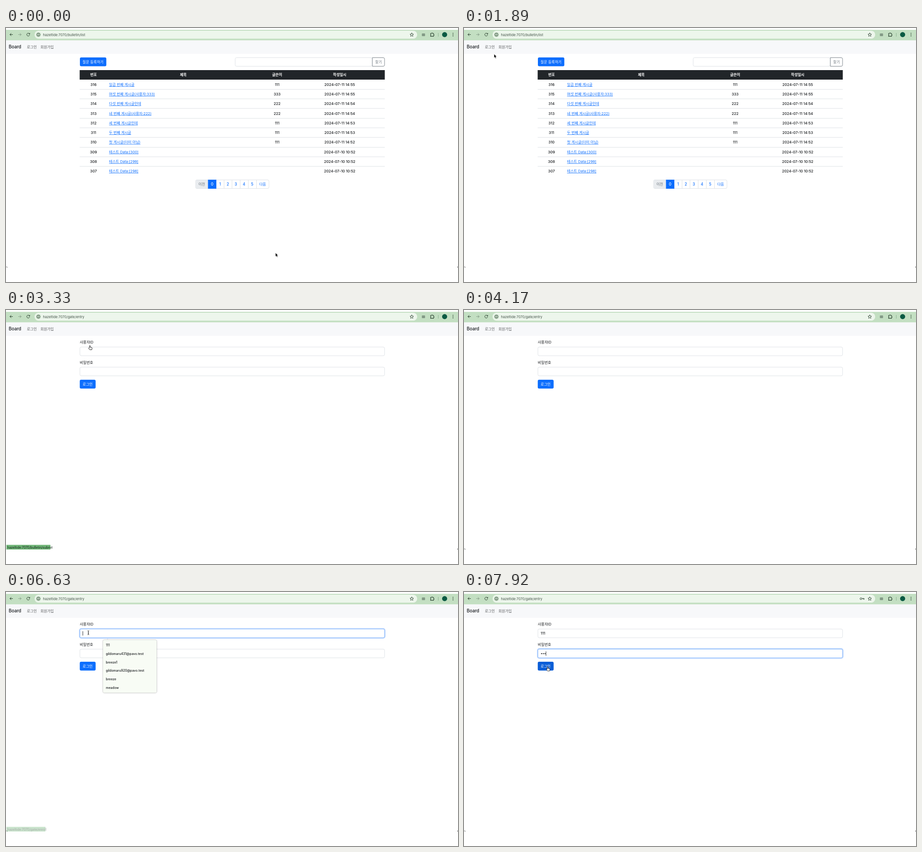
Animation of 997x561 px, one loop 8 s. Source, as an HTML page:

```html
<!DOCTYPE html>
<html lang="ko">
<head>
<meta charset="utf-8">
<style>
  html, body { margin: 0; width: 100%; height: 100%; overflow: hidden; background: #fff; }
  svg { display: block; }
  text { font-family: Inter, 'Noto Sans CJK KR', 'Noto Sans CJK', sans-serif; white-space: pre; }
</style>
</head>
<body>
<svg id="stage" width="997" height="561" viewBox="0 0 997 561"></svg>
<script>
const LOOP = 8000;
const BLUE = '#0d6efd', HOVER = '#0b5ed7', INK = '#16191c', LINE = '#dee2e6';
const HOST = 'hazeltide:7070/';

// y is the vertical middle of the text
const text = (x, y, str, { size = 8, fill = INK, weight = 400, anchor = 'start', more = '' } = {}) =>
  `<text x="${x}" y="${y + size * .36}" font-size="${size}" fill="${fill}" font-weight="${weight}" text-anchor="${anchor}" ${more}>${str}</text>`;
const centered = (x, y, str, opts) => text(x, y, str, { anchor: 'middle', ...opts });
const rect = (x, y, w, h, fill, more = '') =>
  `<rect x="${x}" y="${y}" width="${w}" height="${h}" fill="${fill}" ${more}/>`;
const path = (d, stroke, width = 1, more = '') =>
  `<path d="${d}" fill="none" stroke="${stroke}" stroke-width="${width}" ${more}/>`;
const group = (id, body) => `<g id="${id}">${body}</g>`;

function browser() {
  const dark = '#263c2b', grey = '#839a86';
  return rect(0, 4, 997, 23.5, '#c3dfc2') + rect(63, 6, 844, 17.5, '#edf6ec', 'rx="8.7"') +
    path('M15 14.5H8.6M11.6 11.5l-3 3 3 3', dark) +
    path('M27.2 14.5h6.4M30.6 11.5l3 3-3 3', grey) +
    path('M51.6 12.6a3.2 3.2 0 1 0 .6 2.6M52.4 11v2.4H50', dark) +
    '<circle cx="71.5" cy="14.7" r="6" fill="#d3e6d3"/>' +
    '<circle cx="71.5" cy="14.7" r="3.4" fill="none" stroke="#263c2b"/>' +
    path('M71.5 14.2v2.4M71.5 12.7v.9', dark) +
    path('M895 10.7l1.1 2.7 2.9.2-2.2 1.9.7 2.9-2.5-1.6-2.5 1.6.7-2.9-2.2-1.9 2.9-.2z', dark, .9) +
    rect(917.3, 12, 7, 6, grey, 'rx="1"') +
    path('M936.5 12h2.2a1.2 1.2 0 0 1 2.4 0h2v2.2a1.2 1.2 0 0 1 0 2.4v1.8h-6.6v-2a1.2 1.2 0 0 0 0-2.2z', dark, 1.1) +
    path('M953.5 11v8', '#8db391') +
    '<circle cx="967.5" cy="14.6" r="5.6" fill="#0a5a43"/>' +
    [11.6, 14.6, 17.6].map(y => `<circle cx="986" cy="${y}" r=".9" fill="${dark}"/>`).join('') +
    group('key', `<circle cx="875.5" cy="14.8" r="2" fill="none" stroke="${dark}"/>` +
      path('M877.6 14.2h5v2.6M880.4 14.2v2.4', dark)) +
    rect(0, 27.5, 997, 29.5, '#f7f8fa') +
    text(6, 41.8, 'Board', { size: 9.8, weight: 500 }) +
    text(46, 41.8, '로그인', { fill: '#595b5d' }) + text(76, 41.8, '회원가입', { fill: '#595b5d' }) +
    path('M1 527l2 2', '#222') + path('M996.5 527v2', '#222');
}

function listPage() {
  const titles = ['일곱 번째 게시글', '여섯 번째 게시글(사용자:333)', '다섯 번째 게시글인데',
    '네 번째 게시글(사용자:222)', '세 번째 게시글인데', '두 번째 게시글', '첫 게시글(더미 아님)',
    '테스트 Data:[300]', '테스트 Data:[299]', '테스트 Data:[298]'];
  const writers = [111, 333, 222, 222, 111, 111, 111];
  const minutes = [55, 55, 54, 54, 53, 53, 52];
  const cell = { size: 8.1, weight: 500 };
  const head = { fill: '#fff', weight: 700 };

  let out = rect(163, 65, 58.3, 19.5, BLUE, 'rx="3" id="create"') +
    centered(192, 74.8, '질문 등록하기', { fill: '#fff', weight: 500 }) +
    rect(505.5, 65.5, 302.5, 19, '#fff', `rx="3" stroke="${LINE}"`) +
    path('M808 65.5h24a3 3 0 0 1 3 3v13a3 3 0 0 1-3 3h-24z', '#6c757d', .9) +
    centered(821.7, 75, '찾기', { fill: '#6c757d' }) +
    rect(162.5, 93, 673, 21, '#212529') +
    centered(193, 103.5, '번호', head) + centered(391, 103.5, '제목', head) +
    centered(598, 103.5, '글쓴이', head) + centered(736, 103.5, '작성일시', head);

  titles.forEach((title, i) => {
    const y = 124.9 + i * 21.27;
    const date = i < 7 ? `2024-07-11 14:${minutes[i]}` : '2024-07-10 10:52';
    out += centered(193, y, 316 - i, cell) +
      text(227.3, y, title, { fill: BLUE, more: 'text-decoration="underline"' }) +
      centered(598, y, writers[i] ?? '', cell) + centered(736, y, date, cell);
    if (i < 9) out += rect(162.5, Math.round(y + 10), 673, 1, LINE);
  });

  const edges = [418, 445.5, 464, 480.5, 498, 516, 534, 552, 580];
  out += rect(418, 335.5, 162, 19, '#fff', `rx="3" stroke="${LINE}"`) +
    rect(418.5, 336, 27, 18, '#e9ecef') + rect(445.5, 335, 18.5, 20, BLUE);
  ['이전', 0, 1, 2, 3, 4, 5, '다음'].forEach((label, i) => {
    const fill = i == 0 ? '#6c757d' : i == 1 ? '#fff' : BLUE;
    if (i > 2) out += rect(edges[i], 335.5, 1, 19, LINE);
    out += centered((edges[i] + edges[i + 1]) / 2, 345.2, label, { fill, size: i % 7 ? 8.4 : 8, weight: i % 7 ? 500 : 400 });
  });
  return out;
}

function field(id, y) {
  return rect(163, y, 672, 19.2, '#fff', `rx="3" stroke="${LINE}"`) +
    group(id, rect(162, y - 1, 674, 21.2, 'none', 'rx="4" stroke="#0d6efd" stroke-opacity=".25" stroke-width="2.2"') +
      rect(163, y, 672, 19.2, '#fff', 'rx="3" stroke="#86b7fe"'));
}

function loginPage() {
  const names = ['111', 'gildomaru431@pavo.test', 'breeze1', 'gildomaru920@pavo.test', 'breeze', 'meadow'];
  return text(162.7, 71.3, '사용자ID') + field('ring1', 81.8) +
    text(162.7, 115.7, '비밀번호') + field('ring2', 126.2) +
    text(169, 91.5, '111', { size: 8.2, weight: 500, more: 'id="user"' }) +
    group('dots', [0, 1, 2].map(i => `<circle cx="${171 + i * 3.8}" cy="136.2" r="1.15" fill="${INK}"/>`).join('')) +
    rect(0, 0, .9, 9.6, INK, 'id="caret"') +
    rect(162.7, 154, 35, 19.6, BLUE, 'rx="3" id="submit"') +
    centered(180.1, 164, '로그인', { fill: '#fff', weight: 500 }) +
    group('suggest', rect(214, 106, 118.3, 116.5, '#f8fcf5',
      'rx="3" style="filter:drop-shadow(0 .6px 1.2px #0007)"') +
      path('M223 104.5l2-1', '#b9c7dd', .8) +
      names.map((name, i) => text(220.2, 117.8 + i * 18.65, name, { size: 7, weight: 500 })).join(''));
}

const pointers =
  group('arrow', '<path d="M0 0v8.4l1.9-1.7 1.4 3 1.5-.7-1.4-2.9h2.5z" fill="#000" stroke="#fff" stroke-width=".6"/>') +
  group('hand', '<path d="M-.9 5.2V.8a.9.9 0 0 1 1.8 0v2.7l3.2.8q1 .3.9 1.4l-.8 3.5h-4.6l-2.6-3.3q.5-1.4 2.1-.7z" fill="#fff" stroke="#111" stroke-width=".9"/>') +
  group('ibeam', path('M-1.8-4.5q1.8 0 1.8 1V3.4q0 1-1.8 1M1.8-4.5q-1.8 0-1.8 1V3.4q0 1 1.8 1M-1 1H1', '#222', .9));

const stage = document.getElementById('stage');
stage.innerHTML = browser() + text(81.5, 14.9, '', { size: 7.5, fill: '#435348', more: 'id="url"' }) +
  group('list', listPage()) + group('login', loginPage()) +
  group('status', rect(1, 518.7, 97, 10.3, '#70b577', 'id="statusBox"') +
    text(3, 524, '', { size: 7, fill: '#13251a', more: 'id="statusText"' })) +
  group('pointer', pointers);
const $ = id => document.getElementById(id);

// time, x, y of the pointer hot spot
const route = [[480, 594.4, 496.6], [1230, 60, 50], [1560, 36, 60], [1890, 66.3, 57.5], [2070, 92, 62],
  [2430, 185, 78.6], [3390, 185, 78.6], [3540, 181.6, 90], [4890, 181.6, 90], [5250, 99.4, 87.2],
  [5430, 99.4, 87.2], [5760, 90, 42], [6210, 90, 42], [6420, 181.6, 90], [7440, 181.6, 90],
  [7740, 181.5, 163.5], [7830, 181.5, 163.5], [7920, 184.6, 165.2]];

const clamp = v => Math.min(1, Math.max(0, v));
const ramp = (t, from, to) => clamp((t - from) / (to - from));
const between = (t, from, to) => t >= from && t < to;
const pulse = (t, a, b, c, d) => ramp(t, a, b) - ramp(t, c, d);
const show = (id, on) => $(id).style.display = on ? '' : 'none';

function pointerAt(t) {
  const i = route.findIndex(stop => stop[0] > t);
  if (i == 0) return route[0].slice(1);
  if (i < 0) return route.at(-1).slice(1);
  const [a, b] = [route[i - 1], route[i]];
  const p = ramp(t, a[0], b[0]), e = p * p * (3 - 2 * p);
  return [a[1] + (b[1] - a[1]) * e, a[2] + (b[2] - a[2]) * e];
}

function draw(t) {
  const onList = t < 2970;
  const [x, y] = pointerAt(t);
  show('list', onList);
  show('login', !onList);
  $('url').textContent = HOST + (onList ? 'bulletin/list' : 'gate/entry');

  const overCreate = t < 3400 && x > 163 && x < 221 && y > 65 && y < 85;
  const overSubmit = t > 7440 && y > 154;
  const overNav = between(t, 5700, 6300) && y < 48;
  const overField = !onList && x > 163 && y > 82 && y < 101;
  const kind = overCreate || overSubmit || overNav ? 'hand' : overField ? 'ibeam' : 'arrow';
  for (const id of ['arrow', 'hand', 'ibeam']) show(id, id == kind);
  show('pointer', !between(t, 3600, 4260) && !between(t, 6900, 7440));
  $('pointer').setAttribute('transform', `translate(${x} ${y})`);
  $('create').setAttribute('fill', overCreate ? HOVER : BLUE);
  $('submit').setAttribute('fill', overSubmit ? HOVER : BLUE);

  const creating = t < 4000;
  $('status').style.opacity = pulse(t, 2460, 2610, 3600, 3720) + pulse(t, 5760, 5910, 6480, 6720);
  $('statusBox').setAttribute('width', creating ? 97 : 86);
  $('statusText').textContent = HOST + (creating ? 'bulletin/submit' : 'gate/enroll');

  $('ring1').style.opacity = pulse(t, 4320, 4470, 5200, 5370) + pulse(t, 6390, 6540, 6990, 7140);
  $('ring2').style.opacity = ramp(t, 6990, 7140);
  show('suggest', between(t, 4440, 5190) || between(t, 6510, 6870));
  show('user', t >= 6870);
  show('key', t >= 7200);

  const typed = [7200, 7290, 7380].filter(at => t >= at).length;
  [...$('dots').children].forEach((dot, i) => dot.style.display = i < typed ? '' : 'none');
  const inPassword = t >= 6990;
  show('caret', between(t, 4380, 5190) || t >= 6420);
  $('caret').setAttribute('x', inPassword ? 169 + typed * 3.8 : t >= 6870 ? 181.5 : 169);
  $('caret').setAttribute('y', inPassword ? 131.2 : 86.6);
}

function tick() {
  draw(performance.now() % LOOP);
  requestAnimationFrame(tick);
}
tick();
</script>
</body>
</html>
```
